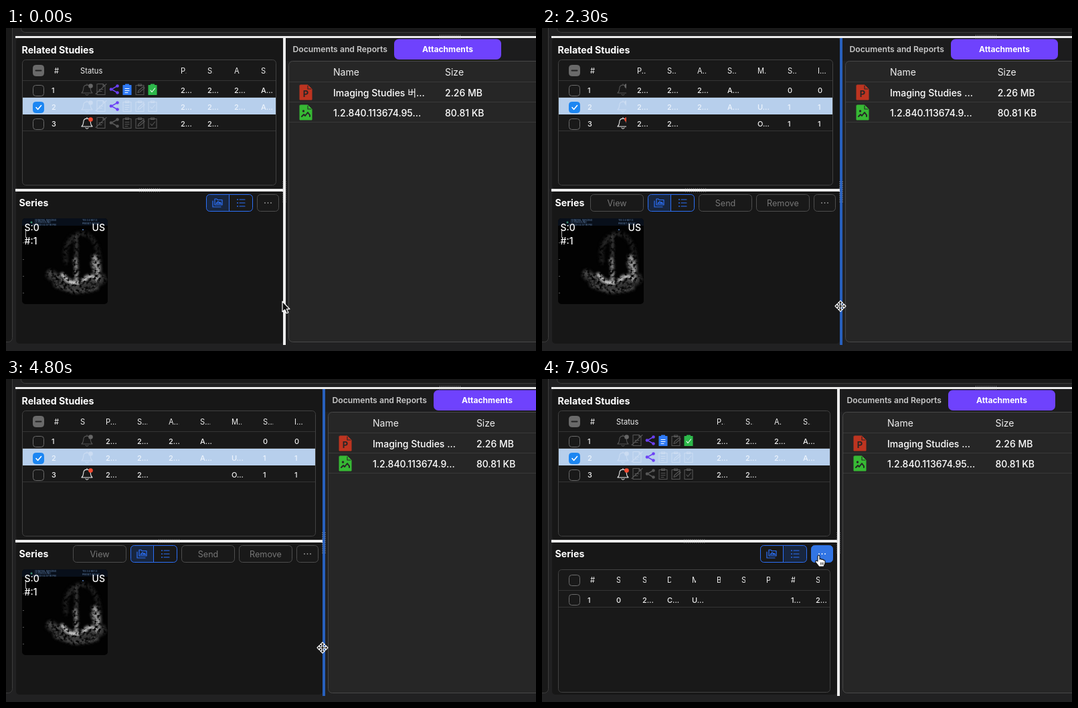
These frames come from a looping animation (792x482 px, 8 s). An HTML page:

```html
<!DOCTYPE html>
<html lang="en">
<head>
<meta charset="utf-8">
<title>Resizable study panels</title>
<style>
html, body { margin: 0; width: 792px; height: 482px; overflow: hidden; background: #212122; }
svg { display: block; }
text { font-family: Inter, "Noto Sans CJK KR", "Noto Sans CJK", sans-serif; white-space: pre; }
</style>
</head>
<body>
<svg width="792" height="482" viewBox="0 0 792 482">
  <defs>
    <filter id="soft" x="-30%" y="-30%" width="160%" height="160%" color-interpolation-filters="sRGB">
      <feGaussianBlur stdDeviation="1.9" result="b"/>
      <feTurbulence type="fractalNoise" baseFrequency=".22" numOctaves="3" seed="4"/>
      <feColorMatrix values="0 0 0 0 0  0 0 0 0 0  0 0 0 0 0  3.4 0 0 0 -.95"/>
      <feComposite in="b" operator="in"/>
    </filter>
    <clipPath id="round"><rect x="24" y="284" width="128" height="128" rx="5"/></clipPath>
  </defs>
  <g id="ui"></g>
  <g id="thumb" clip-path="url(#round)"></g>
  <g id="top"></g>
</svg>
<script>
const LOOP = 8000, STEP = 100;
const DRAG_ON = 200, DRAG_OFF = 5500, LIST_ON = 7300, HOVER_ON = 7700;
const SPLIT = [[0, 416], [200, 416], [600, 388], [1600, 499], [2300, 447], [3200, 488],
  [4000, 460], [4800, 475], [5400, 443], [LOOP, 443]];
const POINTER_X = [[0, 413], [200, 415], [600, 387], [1600, 498], [2300, 446], [3200, 487],
  [4000, 459], [4800, 473], [5400, 442], [6100, 424], [6500, 424], [7200, 379], [7400, 379], [7900, 413], [LOOP, 413]];
const POINTER_Y = [[0, 408], [600, 440], [1600, 408], [2300, 415], [3200, 387], [4000, 395],
  [4800, 401], [5400, 400], [6100, 268], [6500, 268], [7200, 260], [7400, 260], [7900, 264], [LOOP, 264]];

const $ = id => document.getElementById(id);

function at(keys, t) {
  const i = Math.max(1, keys.findIndex(k => k[0] >= t));
  const [t0, a] = keys[i - 1], [t1, b] = keys[i];
  return a + (b - a) * (1 - Math.cos(Math.PI * (t - t0) / (t1 - t0))) / 2;
}

// Drawing helpers
const rect = (x, y, w, h, fill, r = 0, stroke = 'none') =>
  `<rect x="${x}" y="${y}" width="${w}" height="${h}" rx="${r}" fill="${fill}" stroke="${stroke}"/>`;
const frame = (x, y, w, h, fill, r, stroke) => rect(x + .5, y + .5, w - 1, h - 1, fill, r, stroke);
const line = (x, y, w, color = '#343434') => rect(x, y, w, 1, color);
const text = (x, mid, s, size = 11.2, fill = '#eee', weight = 400, anchor = 'start') =>
  `<text x="${x}" y="${mid + size * .36}" font-size="${size}" fill="${fill}" font-weight="${weight}" text-anchor="${anchor}">${s}</text>`;
const path = (d, stroke, fill = 'none', w = 1.1) =>
  `<path d="${d}" fill="${fill}" stroke="${stroke}" stroke-width="${w}" stroke-linecap="round" stroke-linejoin="round"/>`;
const dot = (x, y, r, fill) => `<circle cx="${x}" cy="${y}" r="${r}" fill="${fill}"/>`;
const move = (x, y, s) => `<g transform="translate(${x} ${y})">${s}</g>`;
const crop = (x, y, w, h, s) => w > 0
  ? `<svg x="${x}" y="${y}" width="${w}" height="${h}">${move(-x, -y, s)}</svg>` : '';

function grip(cx, cy, upright) {
  let s = '';
  for (let i = -15; i <= 15; i += 3)
    for (const j of [-2, 2])
      s += upright ? rect(cx + j - .5, cy + i, 1, 1, '#b4b4b4') : rect(cx + i, cy + j - .5, 1, 1, '#b4b4b4');
  return s;
}

function checkbox(y, state) {
  const fill = { on: '#1c86f2', some: '#6a6a6a' }[state] || 'none';
  const s = frame(40, y - 8, 17, 17, fill, 4, state ? fill : '#6b6b6b');
  if (state === 'on') return s + path(`M45 ${y + .5}l2.6 3 5-6`, '#fff', 'none', 1.6);
  return state ? s + path(`M44.5 ${y + .5}h8`, '#222', 'none', 2) : s;
}

// Status icons, each drawn around its own centre
const bell = (c, spot) => path('M-8 5.5C-5 3-5.5 0-5-3C-4-7.5 4-7.5 5-3C5.5 0 5 3 8 5.5ZM-2 7.5Q0 10 2 7.5M0-7V-8', c) + dot(5.5, -5, 3.3, spot);
const fileOff = c => path('M-5-8H3L6-5V8H-6V-8M3-8V-5H6M-3 0H3M-3 3H1M-8 7L8-8', c);
const share = c => path('M5-5L-4 0L5 5', c, 'none', 1.5) + dot(5, -5, 2.3, c) + dot(-4.5, 0, 2.3, c) + dot(5, 5, 2.3, c);
const board = (c, fill, mark, inner) =>
  path('M-6-6H6V8H-6Z', c, fill) + path('M-2.5-7.5H2.5V-5H-2.5Z', c, fill) + path(mark, inner);
const LINES = 'M-3-1H3M-3 2H3M-3 5H1', PEN = 'M-3 5L-2 2L5-4L7-2L0 4Z', TICK = 'M-3 1.5L-1 4L3.5-1.5';

function statusIcons(row, y) {
  const c = ['#555', '#cbdcf2', '#565656'][row - 1], first = row === 1;
  const purple = row < 3 ? '#6c40f5' : c;
  return move(121, y, row === 3 ? bell('#eee', '#f5492f') : bell(c, first ? '#666' : c))
    + move(142, y, fileOff(c))
    + move(161.5, y, share(purple))
    + move(181, y, first ? board('#2f7af5', '#2f7af5', LINES, '#fff') : board(c, 'none', LINES, c))
    + move(200, y, board(c, 'none', PEN, c))
    + move(219, y, first ? board('#2db84b', '#2db84b', TICK, '#fff') : board(c, 'none', TICK, c));
}

function studies(x) {
  const wide = x >= 445;
  const col = wide ? Math.max(45, Math.round((x - 108) * .1285)) : Math.max(40, (x - 271) / 4);
  const status = wide ? Math.max(31, x - 108 - 7 * col) : 150;
  const right = x - 12, left = i => 111 + status + i * col;
  const us = col >= 48;
  const rows = [
    ['2...', '2...', '2...', 'A...', '', '0', '0'],
    ['2...', '2...', '2...', 'A...', us ? 'US' : 'U...', '1', '1'],
    ['2...', '2...', '', '', us ? 'OT' : 'O...', '1', '1']
  ];
  let s = checkbox(63, 'some') + text(72, 64, '#') + crop(111, 54, status - 31, 20, text(111, 64, wide ? 'S...' : 'Status'));
  const count = wide ? 7 : 4;
  [...'PSASMSI'].slice(0, count).forEach((h, i) =>
    s += crop(left(i), 54, col - 31.8, 20, text(left(i), 64, h + '...')));
  s += line(25, 78, right - 26) + rect(25, 104, right - 26, 25, '#b7cfec') + line(25, 103, right - 26) + line(25, 153, right - 26);
  rows.forEach((cells, r) => {
    const y = 93 + r * 25, color = r === 1 ? '#edf4fd' : '#f2f2f2';
    s += checkbox(y, r === 1 && 'on') + text(68, y, r + 1, 11, color, 500);
    s += crop(111, y - 14, status - 16, 25, statusIcons(r + 1, y - 1.5));
    cells.slice(0, count).forEach((v, i) => s += text(left(i), y, v, 11, color, 500));
  });
  return text(23.5, 33, 'Related Studies', 14.2, '#fff', 700)
    + frame(24, 47, right - 24, 188, '#191919', 5, '#414141') + crop(25, 48, right - 26, 186, s);
}

function toolbar(x, list, hover) {
  const wide = x >= 445, tx = wide ? x - 289 : x - 117;
  const button = (bx, label) => frame(bx, 248, 80, 26, '#191919', 5, '#4d4d4d')
    + text(bx + 40, 261, label, 12.6, '#777', 400, 'middle');
  const fill = on => on ? '#18263f' : '#191919', blue = '#2c70f8';
  let s = text(19.5, 261, 'Series', 14.2, '#fff', 700);
  if (wide) s += button(x - 375, 'View') + button(x - 213, 'Send') + button(x - 127, 'Remove');
  s += frame(tx, 248, 70, 26, fill(false), 5, 'none') + rect(tx + (list ? 35 : 1), 249, 34, 24, fill(true), 4)
    + frame(tx, 248, 70, 26, 'none', 5, blue) + rect(tx + 34, 248, 1, 26, blue);
  s += move(tx + 17, 261, path('M-4-6H-1L0-4.5H7V3H-4ZM-7-3V6H5M-2 1L1-2L3 0L4-1L5.500 1Z', blue, 'none', 1.2));
  for (const j of [-5, 0, 5]) s += dot(tx + 47, 261 + j, .9, blue) + path(`M${tx + 50} ${261 + j}h8`, blue);
  s += frame(x - 41, 248, 33, 26, hover ? '#3275e4' : '#191919', 5, hover ? '#3275e4' : '#4d4d4d');
  for (const j of [-4.5, 0, 4.5]) s += dot(x - 24.5 + j, 261, .9, hover ? '#fff' : '#999');
  return s;
}

function seriesList(x) {
  const w = x - 36, left = i => i ? 113 + i * 37 : 111;
  let s = frame(24, 284, w, 184, '#191919', 5, '#414141') + checkbox(300) + text(72, 300, '#')
    + line(25, 315, w - 2) + line(25, 340, w - 2) + checkbox(329) + text(68, 330, '1', 11, '#f2f2f2', 500);
  [...'SSDMBSP#S'].forEach((h, i) => s += crop(left(i), 290, 6, 20, text(left(i), 300, h)));
  ['0', '2...', 'C...', 'U...', '', '', '', '1...', '2...'].forEach((v, i) => s += text(left(i), 330, v, 11, '#f2f2f2', 500));
  return s;
}

function documents(x) {
  const size = 656 + .795 * (x - 416), name = x + 73;
  const title = 'Imaging Studies' + (x < 430 ? ' 버...' : x < 494 ? ' ...' : '...');
  const uid = '1.2.840.113674.' + (x < 445 ? '95' : x < 494 ? '9' : '') + '...';
  const cell = (cx, y, s) => text(cx, y, s, 14, '#fff', 500);
  const sheet = (y, fill, mark) => move(x + 32, y, path('M-8-11H3L9-5V11H-9V-10Z', fill, fill, 1) + path('M3-10V-5H8', '#262626') + mark);
  return rect(x + 2, 15, 800, 34, '#1c1c1d')
    + text(x + 12.5, 32, 'Documents and Reports', 12.2, '#c9c9c9', 600)
    + rect(x + 164, 16.5, 160, 30.5, '#6f42fd', 7) + text(x + 244, 32, 'Attachments', 12.1, '#fff', 700, 'middle')
    + frame(x + 6, 49, 500, 420, '#262626', 6, '#484848')
    + text(name, 66, 'Name', 14) + text(size, 66, 'Size', 14)
    + [80, 110, 140].map(y => line(x + 7, y, 500, '#393939')).join('')
    + sheet(96, '#bd3420', text(0, 2, 'P', 13, '#262626', 700, 'middle'))
    + sheet(126, '#37b934', dot(-3.5, -2, 1.7, '#262626') + path('M-6 6L-3 3L-1 5L3 0L6 4V6', '#262626', 'none', 2))
    + cell(name, 97, title) + cell(size, 97, '2.26 MB')
    + cell(name, 127, uid) + cell(size, 127, '80.81 KB');
}

function ultrasound() {
  const echo = (d, v, w) => path(d, `rgb(${v},${v},${v})`, 'none', w);
  const tiny = (x, y, s) => text(x, y, s, 3.5, '#6486b0');
  let s = rect(24, 284, 128, 128, '#020202') + rect(24, 284, 128, 11, '#080f1a');
  s += `<g filter="url(#soft)">`
    + echo('M90 350C84 318 102 304 118 307C136 313 142 340 139 372', 34, 6)
    + echo('M94 325Q101 306 118 309', 58, 2)
    + echo('M67 368Q80 380 100 384Q122 388 143 374', 50, 15)
    + echo('M65 364L82 376M74 384L96 392Q112 396 136 388', 85, 5)
    + echo('M105 311Q106 340 104 372', 95, 3)
    + echo('M103 345Q107 362 105 382', 190, 4)
    + echo('M84 368Q95 382 107 381', 245, 5)
    + echo('M115 378Q122 367 135 373', 230, 5)
    + echo('M132 342Q140 354 136 375', 165, 7)
    + echo('M129 350L134 366', 210, 3)
    + '</g>';
  s += tiny(43, 286.5, 'GENERAL IMAGING') + tiny(43, 290, 'ULTRASOUND') + tiny(40, 294, '01 2023 02:37:18 PM')
    + tiny(114, 287, 'TIS 0.4 MI 1.2') + tiny(114, 292, 'PRESET ADULT') + dot(38, 290, 1.5, '#3b8b70')
    + dot(115, 301, 1, '#5480c4') + rect(29, 301, 1, 12, '#bbb');
  for (let y = 320; y < 405; y += 25) s += rect(25, y, 2, 1, '#555');
  return s + text(27.5, 298, 'S:0', 14, '#fff', 500) + text(148, 298, 'US', 14, '#fff', 500, 'end') + text(27.5, 318, '#:1', 14, '#fff', 500);
}

// Pointers
const arrow = path('M0 0V15.5L3.7 12.3L6.2 17.8L8.8 16.7L6.4 11.3H11Z', '#fff', '#111', 1.2);
const banned = move(9, 22, `<circle r="7" fill="#222" stroke="#fff" stroke-width="4"/><circle r="7" fill="#ddd" stroke="#222" stroke-width="2"/>` + path('M-5-5L5 5', '#222', 'none', 2));
const resize = path('M-8 0L-4.5-3.5V-1.2H-1.2V-4.5H-3.5L0-8L3.5-4.5H1.2V-1.2H4.5V-3.5L8 0L4.5 3.5V1.2H1.2V4.5H3.5L0 8L-3.5 4.5H-1.2V1.2H-4.5V3.5Z', '#fff', '#111', 1.2);
const hand = path('M-1 8V1Q-1-1 .5-1Q2-1 2 1V5Q4 3.5 5 5.5Q7 4.5 8 6.5Q10 6 10 8V11L8 16H1L-4 9.5Q-5 7-3 7Z', '#111', '#fff', 1.1)
  + path('M3.5 10V13M5.5 10V13M7.3 10V13', '#111', 'none', .8);

function draw(t) {
  const x = Math.round(at(SPLIT, t)), list = t >= LIST_ON;
  const dragging = t >= DRAG_ON && t < DRAG_OFF;
  const px = Math.round(at(POINTER_X, t)), py = Math.round(at(POINTER_Y, t));
  $('ui').innerHTML = frame(-20, -20, 30, 489, '#191919', 6, '#3c3c3c')
    + frame(22, -20, 800, 27, '#191919', 6, '#3c3c3c')
    + rect(15, 15, x - 17, 225, '#171717', 5) + rect(15, 244, x - 17, 227, '#171717', 5)
    + documents(x)
    + rect(14, 12, 778, 3, '#ededed') + grip(663, 13, false)
    + rect(14, 240, x - 16, 4, '#ededed') + grip((x + 12) >> 1, 242, false)
    + rect(x - 2, 15, 4, 458, dragging ? '#2860bd' : '#ededed') + grip(x, 244, true)
    + studies(x) + toolbar(x, list, t >= HOVER_ON) + (list ? seriesList(x) : '');
  $('thumb').style.display = list ? 'none' : '';
  const pointer = dragging ? resize : t >= 7100 ? hand : arrow + (t >= DRAG_OFF && t < 6600 ? banned : '');
  $('top').innerHTML = move(px, py, pointer);
}

$('thumb').innerHTML = ultrasound();
const start = performance.now();
let shown = -1;
function tick() {
  const t = Math.floor((performance.now() - start) % LOOP / STEP) * STEP;
  if (t !== shown) draw(shown = t);
  requestAnimationFrame(tick);
}
tick();
</script>
</body>
</html>
```
